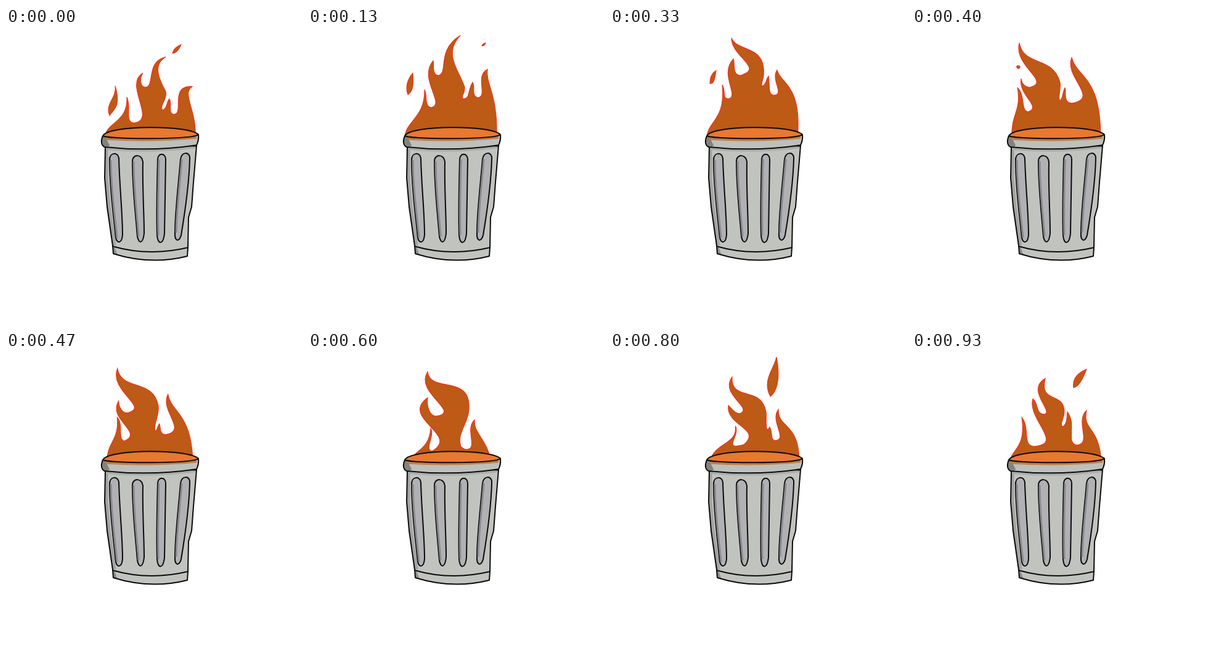
Recreate the animation shown at these times as an HTML page. Size 480 px wide and 480 px high, loop 990 ms.

```html
<!DOCTYPE html>
<html lang="en">
<head>
<meta charset="utf-8">
<title>Burning bin</title>
<style>
html, body { margin: 0; width: 100%; height: 100%; overflow: hidden; background: #fff; }
svg { display: block; width: 100vw; height: 100vh; }

.fire path {
  fill: #bc5a16; stroke: #fb2a1a; stroke-width: 1.1;
  animation: 990ms infinite steps(2);
}
#flame { animation-name: flame; }
#leftSpark { animation-name: left-spark, left-show; }
#rightSpark { animation-name: right-spark, right-show; }

/* Poses are held in steps of about 66 ms */
@keyframes flame {
  0%, 100% { d: path("M160 178 C162 152 198 154 196 112 C204 130 192 152 207 154 C246 150 190 92 222 73 C215 84 219 96 226 96 C242 96 226 54 259 47 C236 60 250 86 259 103 C262 116 248 126 254 133 C261 132 260 120 265 115 C270 124 262 138 272 140 C290 140 264 92 302 95 C284 106 310 134 307 178 Z"); }
  13.13% { d: path("M157 178 C158 150 190 146 189 100 C194 110 188 127 200 129 C224 124 178 82 203 53 C205 60 200 76 212 77 C228 72 208 36 247 12 C218 42 246 70 254 96 C255 106 246 113 253 115 C263 114 259 100 267 88 C272 98 264 111 276 113 C292 110 270 78 291 67 C288 92 308 106 306 178 Z"); }
  27.27% { d: path("M157 178 C158 150 188 150 182 92 C188 102 182 113 191 115 C212 112 176 76 200 50 C203 58 198 76 211 77 C252 66 196 46 197 16 C206 40 254 26 249 78 C248 84 244 92 247 94 C254 92 252 84 257 78 C260 92 255 108 266 109 C284 108 260 84 271 68 C276 90 312 92 304 178 Z"); }
  40.4% { d: path("M162 178 C160 140 178 134 171 97 C184 108 176 134 188 136 C212 128 172 110 177 82 C178 92 186 97 192 96 C226 86 164 62 174 24 C182 64 228 44 240 88 C242 100 236 112 240 118 C245 114 244 104 248 97 C251 104 244 120 259 122 C306 114 246 80 259 48 C268 82 306 76 306 178 Z"); animation-timing-function: steps(3); }
  60.6% { d: path("M166 178 C172 158 196 160 199 124 C206 136 188 158 201 161 C248 134 148 108 194 74 C192 90 198 104 208 104 C250 98 172 66 194 32 C198 66 260 38 261 86 C263 112 242 130 247 150 C247 152 248 154 250 155 C252 157 255 158 258 158 C276 156 254 126 270 110 C268 132 290 140 297 178 Z"); }
  73.73% { d: path("M163 178 C174 140 218 148 216 127 C222 142 182 164 226 149 C248 112 188 126 190 92 C196 98 204 100 209 99 C234 88 174 72 189 39 C190 80 246 48 256 98 C258 108 258 118 260 128 C260 130 261 132 262 134 C263 137 265 140 268 140 C288 138 256 112 268 92 C270 122 308 110 307 178 Z"); animation-timing-function: steps(3); }
  93.93% { d: path("M159 178 C160 158 186 156 178 106 C192 122 178 152 198 153 C248 150 186 108 196 76 C206 84 200 101 215 101 C230 96 184 62 216 43 C206 84 246 64 247 96 C247 108 239 116 244 121 C251 118 251 108 252 97 C268 118 248 148 268 151 C292 148 264 112 283 95 C276 128 304 120 307 178 Z"); animation-timing-function: steps(1); }
}
@keyframes left-spark {
  0% { d: path("M177 94 C180 114 160 122 168 142 C172 134 188 128 177 94 Z"); }
  13.13% { d: path("M170 73 C160 84 158 98 162 108 C168 104 172 98 170 73 Z"); }
  27.27% { d: path("M172 69 C165 73 162 80 162 90 C168 91 170 84 172 69 Z"); }
  40.4%, 100% { d: path("M175 62 C172 60 169 61 170 64 C172 67 175 66 175 62 Z"); }
}
@keyframes left-show {
  0% { opacity: 1; animation-timing-function: steps(1); }
  47.47%, 100% { opacity: 0; }
}
@keyframes right-spark {
  0%, 100% { d: path("M284 27 C276 30 271 35 270 41 C276 41 280 36 284 27 Z"); }
  13.13% { d: path("M288 24 C285 25 282 27 282 29 C285 29 287 27 288 24 Z"); animation-timing-function: steps(1); }
  67.67% { d: path("M263 44 C262 62 240 72 252 100 C266 90 276 74 263 44 Z"); animation-timing-function: steps(1); }
  73.73% { d: path("M265 31 C262 48 240 56 260 87 C278 78 272 60 265 31 Z"); animation-timing-function: steps(1); }
  80.8% { d: path("M270 8 C266 28 246 46 260 72 C268 66 278 48 270 8 Z"); }
  93.93% { d: path("M283 28 C268 34 260 44 262 58 C270 56 276 46 283 28 Z"); animation-timing-function: steps(1); }
}
@keyframes right-show {
  0% { opacity: 1; animation-timing-function: steps(1); }
  20.2% { opacity: 0; animation-timing-function: steps(1); }
  67.67%, 100% { opacity: 1; }
}

.ink { fill: none; stroke: #0b0b0b; stroke-width: 2; stroke-linecap: round; stroke-linejoin: round; }
.slots path { fill: #b1b0b4; stroke: #0b0b0b; stroke-width: 2; }
.slots .shade { fill: none; stroke: #88888a; stroke-width: 3; }
</style>
</head>
<body>
<svg viewBox="0 0 480 480">
  <defs>
    <path id="body" d="M161 192 L160 243 L164 290 L173 353 L174 366 Q235 385 294 370 L295 356 L296 307 L301 290 L304 250 L309 191 Z"/>
    <path id="rim" d="M157 175 C153 184 155 191 160 193 Q235 201 309 190 Q313 182 312 173 Q235 185 157 175 Z"/>
    <clipPath id="bodyClip"><use href="#body"/></clipPath>
    <clipPath id="rimClip"><use href="#rim"/></clipPath>
  </defs>

  <g class="fire">
    <path id="flame"/>
    <path id="leftSpark"/>
    <path id="rightSpark"/>
  </g>

  <use href="#body" fill="#c1c4be"/>
  <g clip-path="url(#bodyClip)" fill="none">
    <path stroke="#a0a3a1" stroke-width="9" d="M161 192 L161 243 L165 290 L174 353"/>
    <path stroke="#a9acaa" stroke-width="3" d="M160 196 Q235 203 310 193"/>
    <path stroke="#8b8e8c" stroke-width="9" d="M172 357 L176 368"/>
  </g>
  <use href="#body" class="ink"/>
  <path class="ink" d="M173 354 Q232 371 295 356"/>

  <g class="slots">
    <path d="M168 214 C168 201 182 201 183 211 C184 255 189 300 189 335 C188 350 180 350 178 340 C174 300 168 260 168 214 Z"/>
    <path class="shade" d="M170 214 C170 260 176 300 180 340"/>
    <path d="M205 216 C205 204 221 204 222 217 C221 260 224 300 224 333 C222 351 215 350 213 338 C210 300 205 260 205 216 Z"/>
    <path class="shade" d="M207 216 C207 260 212 300 215 338"/>
    <path d="M246 213 C246 202 259 202 259 213 L257 333 C255 352 246 352 245 336 C244 300 245 250 246 213 Z"/>
    <path class="shade" d="M248 213 C247 250 246 300 247 336"/>
    <path d="M283 213 C284 200 299 200 298 212 C297 250 290 300 284 336 C281 348 273 346 274 332 C274 300 280 250 283 213 Z"/>
    <path class="shade" d="M285 213 C282 250 276 300 276 332"/>
  </g>

  <use href="#rim" fill="#bdc0bb"/>
  <g clip-path="url(#rimClip)" fill="none">
    <path stroke="#808381" stroke-width="14" d="M154 178 L162 194"/>
    <path stroke="#c0733a" stroke-width="9" opacity=".85" d="M160 177 Q235 182 309 175"/>
  </g>
  <path fill="#e97830" d="M157 175 C166 157 298 157 312 173 C300 181 170 181 157 175 Z"/>
  <path class="ink" d="M157 175 C166 157 298 157 312 173 C300 181 170 181 157 175 C153 184 155 191 160 193 Q235 201 309 190 Q313 182 312 173"/>
</svg>
</body>
</html>
```
